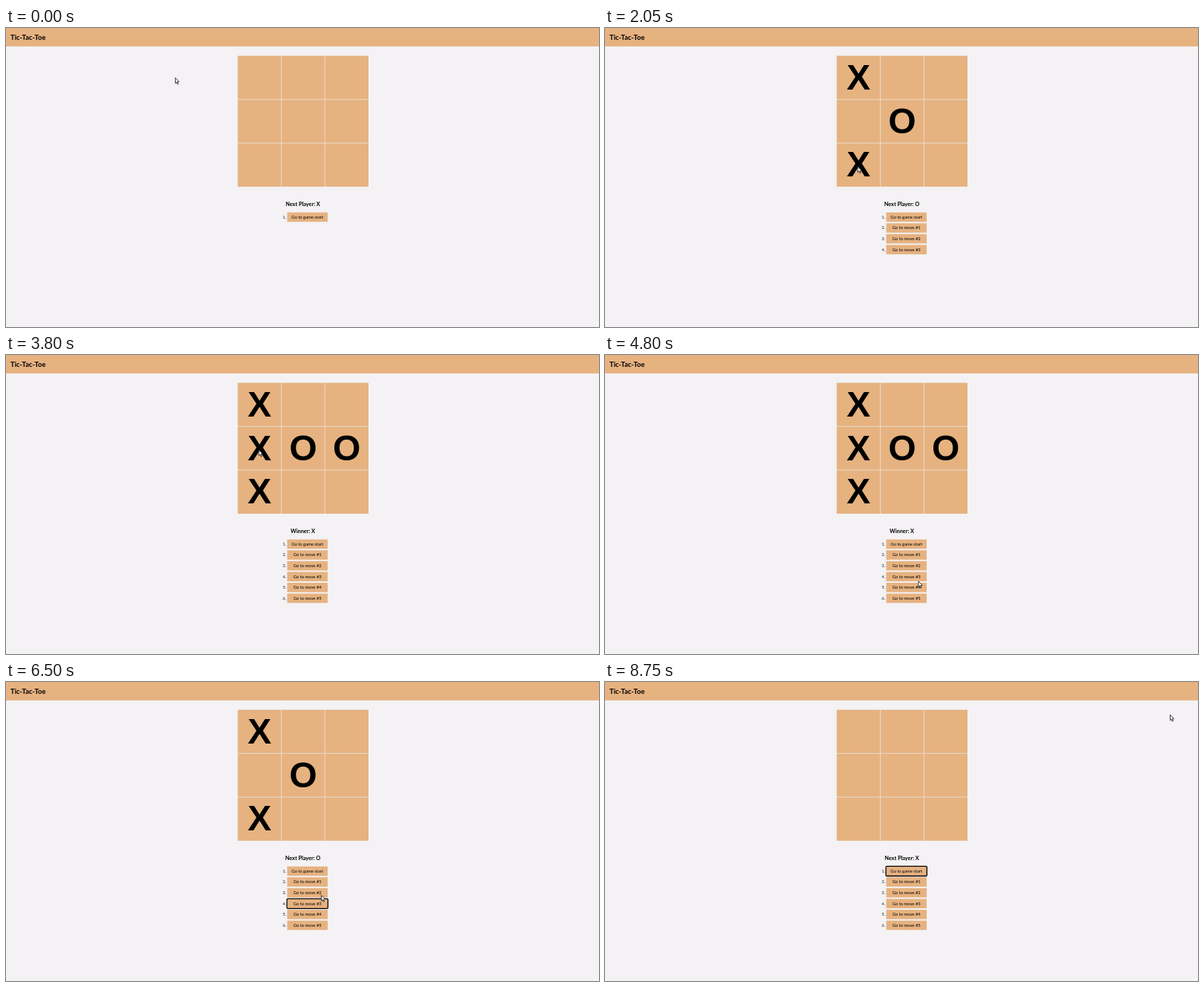
These frames come from a looping animation (800x403 px, 8850 ms). An HTML page with a canvas:

```html
<!DOCTYPE html>
<html lang="en">
<head>
<meta charset="utf-8">
<title>Tic-Tac-Toe</title>
<style>
  html, body { margin: 0; width: 100%; height: 100%; overflow: hidden; background: #f4f2f4; }
  canvas { display: block; width: 800px; height: 403px; }
</style>
</head>
<body>
<canvas id="stage"></canvas>
<script>
const LOOP = 8850, STEP = 50;
const TAN = '#e6b280', PAPER = '#f4f2f4', LINE = '#eadbce', INK = '#000';
const BOARD = { x: 312.6, y: 37.5, cell: 58.8 };
const BUTTON = { x: 379.4, y: 248.6, w: 54.5, h: 12.6, pitch: 14.6 };

const canvas = document.getElementById('stage');
const ctx = canvas.getContext('2d');
const ratio = window.devicePixelRatio || 1;
canvas.width = 800 * ratio;
canvas.height = 403 * ratio;
ctx.scale(ratio, ratio);

const corner = square => ({
  x: BOARD.x + square % 3 * BOARD.cell,
  y: BOARD.y + Math.floor(square / 3) * BOARD.cell
});
const buttonTop = i => BUTTON.y + i * BUTTON.pitch;

// Pointer stops: pass a point, play a square, or jump to an earlier move.
const pass = (at, x, y) => ({ at, x, y });
const play = (at, square) => {
  const { x, y } = corner(square);
  return { at, square, x: x + 28, y: y + 31 };
};
const jump = (at, move) => ({ at, move, x: 425, y: buttonTop(move) + 7.5 });

const STOPS = [
  pass(0, 228, 66.3), pass(400, 228, 66.3),
  play(900, 0), play(1500, 4), play(2050, 6),
  pass(2900, 368.3, 135.8), play(3200, 5), play(3800, 3),
  pass(4800, 422.5, 304.3), jump(5150, 5), jump(5600, 4), jump(6100, 3),
  jump(6600, 2), jump(7350, 1), jump(8000, 0),
  pass(8400, 783, 34), pass(8600, 762, 43.5), pass(LOOP, 762, 43.5)
];
const SQUARES = STOPS.filter(s => 'square' in s).map(s => s.square);

function pointerAt(t) {
  const i = STOPS.findIndex(s => s.at > t);
  const a = STOPS[i - 1], b = STOPS[i];
  const u = (t - a.at) / (b.at - a.at), k = u * u * (3 - 2 * u);
  return { x: a.x + (b.x - a.x) * k, y: a.y + (b.y - a.y) * k };
}

function gameAt(t) {
  const game = { shown: 0, played: 0, focus: -1 };
  for (const stop of STOPS.filter(s => s.at <= t)) {
    if ('square' in stop) game.shown = ++game.played;
    if ('move' in stop) game.shown = game.focus = stop.move;
  }
  return game;
}

function rect(x, y, w, h, color) {
  ctx.fillStyle = color;
  ctx.fillRect(x, y, w, h);
}

function text(string, x, y, font, align = 'center', color = INK) {
  ctx.font = font;
  ctx.textAlign = align;
  ctx.fillStyle = color;
  ctx.fillText(string, x, y);
}

function drawBoard(shown) {
  const { x, y, cell } = BOARD, size = cell * 3;
  rect(x, y, size, size, TAN);
  for (const i of [1, 2]) {
    rect(x + i * cell - 0.5, y, 1, size, LINE);
    rect(x, y + i * cell - 0.5, size, 1, LINE);
  }
  SQUARES.slice(0, shown).forEach((square, i) => {
    const { x, y } = corner(square);
    text(i % 2 ? 'O' : 'X', x + cell / 2, y + 45.2, 'bold 48px "Liberation Sans", sans-serif');
  });
}

function drawHistory(played, focus) {
  const { x, w, h } = BUTTON, font = '5.8px Lato, sans-serif';
  for (let i = 0; i <= played; i++) {
    const y = buttonTop(i);
    rect(x, y, w, h, TAN);
    text(`${i + 1}.`, x - 1.4, y + 8.2, font, 'right', '#222');
    text(i ? `Go to move #${i}` : 'Go to game start', x + w / 2, y + 8.2, font);
    if (i === focus) {
      ctx.strokeStyle = INK;
      ctx.lineWidth = 1.3;
      ctx.beginPath();
      ctx.roundRect(x - 0.4, y - 0.3, w + 0.8, h + 0.6, 1.2);
      ctx.stroke();
    }
  }
}

const ARROW = new Path2D('M.4 .6V7.5L1.9 6.1 3 8.7 4.1 8.2 3 5.7 5 5.5Z');

function drawPointer({ x, y }) {
  ctx.save();
  ctx.translate(x, y);
  ctx.scale(1.1, 1.1);
  ctx.fillStyle = '#fff';
  ctx.fill(ARROW);
  ctx.strokeStyle = '#222';
  ctx.lineWidth = 0.8;
  ctx.stroke(ARROW);
  ctx.restore();
}

function draw(now) {
  const t = Math.floor(now % LOOP / STEP) * STEP;
  const { shown, played, focus } = gameAt(t);
  const status = shown === 5 ? 'Winner: X' : `Next Player: ${shown % 2 ? 'O' : 'X'}`;
  rect(0, 0, 800, 403, PAPER);
  rect(0, 0, 800, 24.8, TAN);
  text('Tic-Tac-Toe', 6, 15.7, 'bold 9.5px Lato, sans-serif', 'left');
  drawBoard(shown);
  text(status, 400.5, 240, 'bold 7.3px Lato, sans-serif');
  drawHistory(played, focus);
  drawPointer(pointerAt(t));
}

const start = performance.now();
function tick() {
  draw(performance.now() - start);
  requestAnimationFrame(tick);
}
tick();
</script>
</body>
</html>
```
